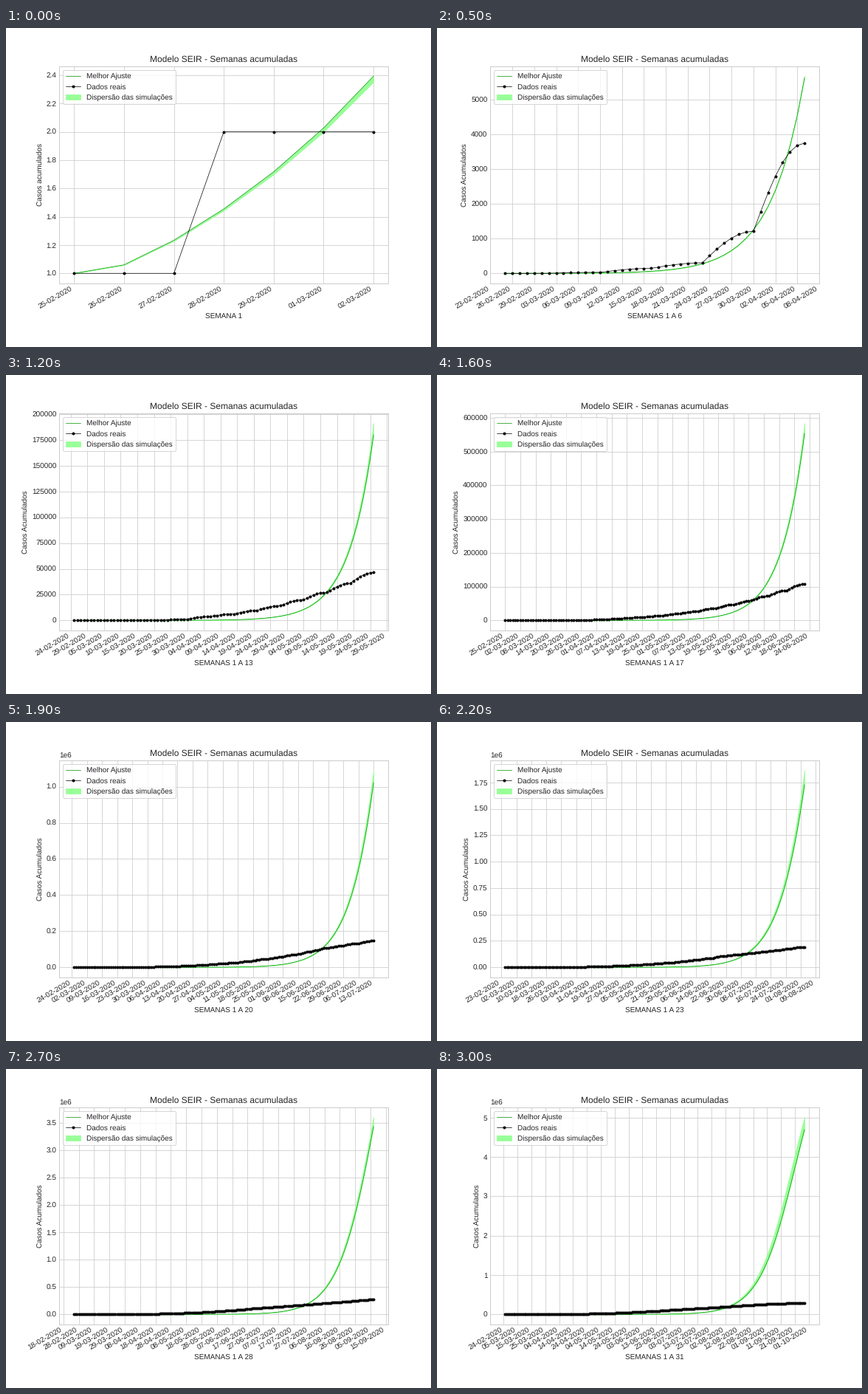
Write a matplotlib script that moves like this. It is 576 by 432 pixels and loops after 3.1 s.

```python
import numpy as np
import matplotlib.pyplot as plt
import matplotlib.dates as mdates
from matplotlib.animation import FuncAnimation

plt.style.use("seaborn-v0_8-whitegrid")
plt.rcParams.update({"font.family": "Liberation Sans", "text.hinting": "none"})

WEEKS = 31
START = np.datetime64("2020-02-25")
CAPACITY = 7.5e6
FIT_COLOR = "#009400"
BAND_COLOR = "#98ff98"

# Values at the end of a few key weeks; the others follow by power laws
REPORTED = {1: 2, 3: 145, 4: 305, 6: 3753, 10: 20030, 13: 46500,
            17: 107500, 20: 147e3, 24: 211e3, 28: 270e3, 31: 287e3}
FITTED = {1: 2.393, 3: 120, 6: 5640, 10: 60000, 17: 554e3,
          23: 1.73e6, 28: 3.432e6, 31: 4.697e6}
# Highest simulation relative to the fit
SPREAD = {1: 1, 6: 1.008, 10: 1.0715, 17: 1.055, 23: 1.0795, 28: 1.05, 31: 1.067}


def between(keys, week):
    """Power-law interpolation between key weeks."""
    logs = np.log(list(keys.values()))
    return np.exp(np.interp(np.log(week), np.log(list(keys)), logs))


def reported_cases():
    """Daily totals: each week rises fast and levels off at the weekend."""
    totals = np.append(0.5, between(REPORTED, np.arange(1, WEEKS + 1)))
    ease = np.sin(np.pi / 2 * np.arange(1, 8) / 7)
    return np.round(totals[:-1, None] + np.diff(totals)[:, None] * ease).ravel()


def delayed(t):
    """Time with a slow start, as infections pass through incubation."""
    return t - np.tanh(1.35 * t) / 1.35


def epidemic(t, end):
    """Saturating growth from 1 case up to `end` on the last day."""
    rate = np.log((CAPACITY - 1) / (CAPACITY / end - 1)) / delayed(t[-1])
    return CAPACITY / (1 + (CAPACITY - 1) * np.exp(-rate * delayed(t)))


CASES = reported_cases()
fig, ax = plt.subplots(figsize=(8, 6), dpi=72)


def draw(frame):
    week = frame + 1
    t = np.arange(7 * week)
    dates = START + t
    end = between(FITTED, week)
    low = epidemic(t, end * (1 - 0.017 / week))
    high = epidemic(t, end * between(SPREAD, week))

    ax.clear()
    ax.plot(dates, epidemic(t, end), color=FIT_COLOR, lw=0.7, label="Melhor Ajuste")
    ax.plot(dates, CASES[:7 * week], color="black", lw=0.7, marker=".",
            ms=6, label="Dados reais")
    ax.fill_between(dates, low, high, color=BAND_COLOR, lw=0.8,
                    label="Dispersão das simulações")

    ax.xaxis.set_major_locator(mdates.DayLocator(interval=min(week // 3 + 1, 10)))
    ax.xaxis.set_major_formatter(mdates.DateFormatter("%d-%m-%Y"))
    fig.autofmt_xdate()
    ax.set_title("Modelo SEIR - Semanas acumuladas")
    ax.set_xlabel("SEMANA 1" if week == 1 else f"SEMANAS 1 A {week}")
    ax.set_ylabel("Casos acumulados" if week == 1 else "Casos Acumulados")
    ax.legend(loc="upper left", frameon=True)
    return []


anim = FuncAnimation(fig, draw, frames=WEEKS, interval=100, repeat=True)
plt.show()
```
